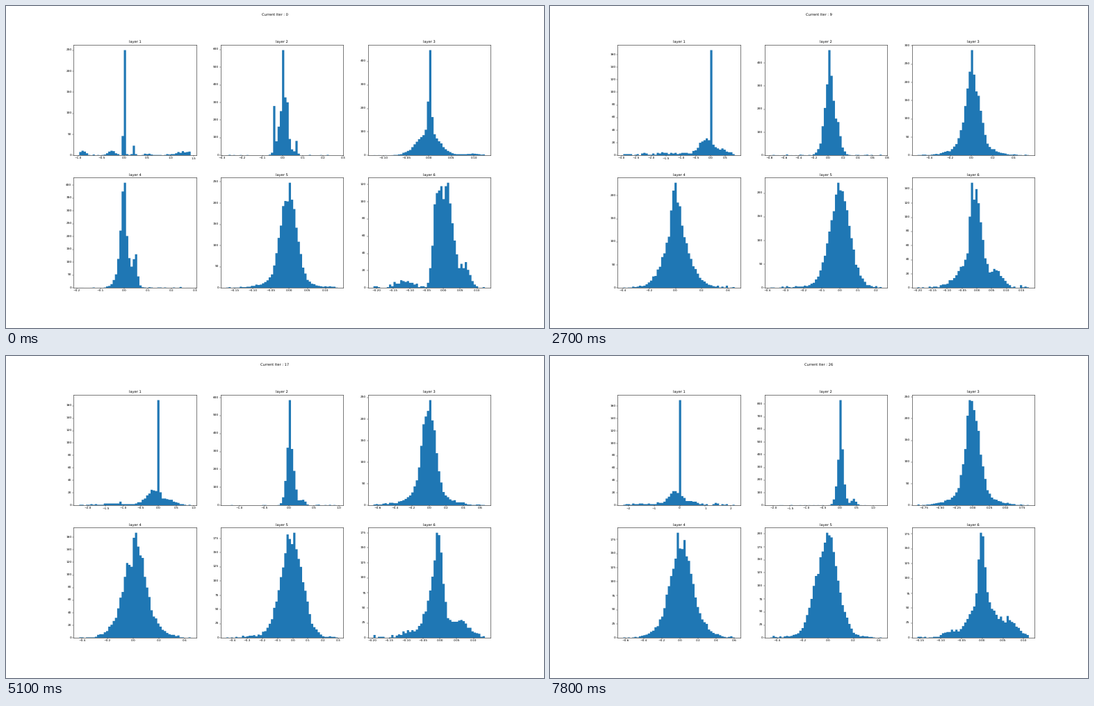
These frames come from a looping animation (774 px wide and 464 px high, 8 s). A matplotlib script:

```python
import matplotlib.pyplot as plt
import numpy as np
from matplotlib.animation import FuncAnimation

WIDTH, HEIGHT, DPI = 774, 464, 31
FRAMES, INTERVAL, FRAMES_PER_STEP = 80, 100, 3
BINS = np.arange(50)
KEY_STEPS = [0, 5, 9, 12, 17, 21, 26]


class Layer:
    """Weight distribution: a value range, a highest count and bell-shaped bumps.

    Each stage maps a training step to bumps (offset from the zero bin,
    relative height, width in bins); shapes blend linearly between stages.
    """

    def __init__(self, number, lows, highs, peaks, stages):
        self.number = number
        self.keys = lows, highs, peaks
        self.stages = stages

    def profile(self, step, zero):
        shapes = [sum(h * np.exp(-.5 * ((BINS - zero - x) / w) ** 2) for x, h, w in bumps)
                  for bumps in self.stages.values()]
        order = np.arange(len(shapes))
        position = np.interp(step, list(self.stages), order)
        weights = np.clip(1 - abs(position - order), 0, 1)
        return weights @ np.array(shapes)

    def histogram(self, step):
        low, high, peak = (np.interp(step, KEY_STEPS, values) for values in self.keys)
        zero = int(-low / (high - low) * len(BINS))
        rng = np.random.default_rng(100 * self.number + step)
        counts = peak * self.profile(step, zero) * rng.normal(1, .07, len(BINS))
        counts += rng.poisson(1, len(BINS))
        counts = np.round(counts * peak / counts.max())
        counts[[0, -1]] = np.maximum(counts[[0, -1]], 1)
        return np.linspace(low, high, len(BINS) + 1), counts


layers = [
    Layer(1, [-.98, -1.908, -2.94, -2.319, -2.253, -2.338, -2.2],
          [1.436, .92, .812, .841, .917, .795, 2.147],
          [250, 188, 167, 179, 169, 180, 170],
          {0: [(0, 1, .3), (-1, .18, .3), (4, .08, .5), (-19, .035, 1.5), (-6, .035, 1.5), (26, .025, 3)],
           5: [(0, 1, .35), (-2.5, .13, 2.5), (4, .04, 3), (-10, .015, 12)]}),
    Layer(2, [-.278, -.595, -.788, -1.024, -1.26, -1.471, -2.092],
          [.273, .576, .725, .874, .974, 1.15, 1.264],
          [597, 338, 455, 522, 586, 505, 832],
          {0: [(0, .55, .4), (0, .5, 1.9), (2, .25, .4), (-4, .42, .35), (6, .13, .5)],
           5: [(0, .9, 2.5), (4, .3, 1)],
           12: [(0, .35, .6), (.3, .65, 1.7), (6, .06, 1)],
           26: [(0, .6, .6), (0, .4, 1.5), (6, .06, 1)]}),
    Layer(3, [-.1226, -.498, -.5095, -.465, -.6526, -.851, -.847],
          [.1242, .571, .542, .471, .653, .82, .854],
          [448, 405, 288, 268, 244, 259, 243],
          {0: [(1, .5, .4), (.7, .4, 1), (0, .25, 5), (20, .02, 3)],
           5: [(0, .45, .6), (0, .4, 3), (.5, .15, 6)],
           12: [(.3, .88, 2.9), (0, .12, 8)]}),
    Layer(4, [-.189, -.591, -.398, -.3305, -.4214, -.49, -.629],
          [.28, .535, .4513, .394, .4485, .535, .607],
          [409, 375, 228, 178, 167, 156, 187],
          {0: [(-.6, .8, 1.2), (0, .28, 3), (4.7, .28, .8)],
           5: [(0, .75, 1.6), (0, .25, 5)],
           12: [(.5, .6, 4), (.8, .4, 7)]}),
    Layer(5, [-.1727, -.2956, -.3846, -.4188, -.4384, -.441, -.4536],
          [.1334, .2088, .2323, .27, .2964, .334, .423],
          [248, 170, 222, 218, 185, 185, 202],
          {0: [(-.5, .92, 3.4), (-2, .1, 8)],
           5: [(-.7, 1, 5.3)],
           9: [(-.3, .95, 4.3), (-2, .05, 9)],
           26: [(0, .95, 4.8), (-2, .05, 9)]}),
    Layer(6, [-.2085, -.201, -.2002, -.2235, -.1973, -.1706, -.1564],
          [.1236, .1832, .1754, .189, .1334, .1169, .1127],
          [122, 164, 149, 164, 175, 152, 177],
          {0: [(-3, .85, 1.6), (2, .95, 2.6), (10, .2, 2), (-17, .07, 3)],
           5: [(-2.2, .7, .8), (1.5, .65, 2.8), (-8, .15, 2.5), (10, .1, 2.5)],
           12: [(0, .6, 1.9), (-3, .35, 3), (9, .13, 3), (-12, .05, 3)],
           26: [(-.6, .6, 1.2), (-.5, .4, 5), (12, .14, 4), (-15, .05, 3)]}),
]

plt.rcParams.update({"font.family": "DejaVu Sans", "text.hinting": "none",
                     "axes.linewidth": 1.2})
fig, axes = plt.subplots(2, 3, figsize=((WIDTH + .01) / DPI, (HEIGHT + .01) / DPI), dpi=DPI)
fig.subplots_adjust(left=.1258, right=.9004, bottom=.1243, top=.8793, wspace=.2, hspace=.2)
heading = fig.suptitle("", y=.979)
bars = []
for layer, ax in zip(layers, axes.flat):
    ax.set_title(f"layer {layer.number}")
    edges, counts = layer.histogram(0)
    bars.append(ax.stairs(counts, edges, fill=True, color="#1f77b4", lw=0, snap=False))


def update(frame):
    step = frame // FRAMES_PER_STEP
    heading.set_text(f"Current Iter : {step}")
    for layer, ax, patch in zip(layers, axes.flat, bars):
        edges, counts = layer.histogram(step)
        patch.set_data(counts, edges)
        margin = .05 * (edges[-1] - edges[0])
        ax.set_xlim(edges[0] - margin, edges[-1] + margin)
        ax.set_ylim(0, 1.05 * counts.max())
    return [heading, *bars]


animation = FuncAnimation(fig, update, frames=FRAMES, interval=INTERVAL,
                          repeat=True, repeat_delay=0, blit=False)
plt.show()
```
